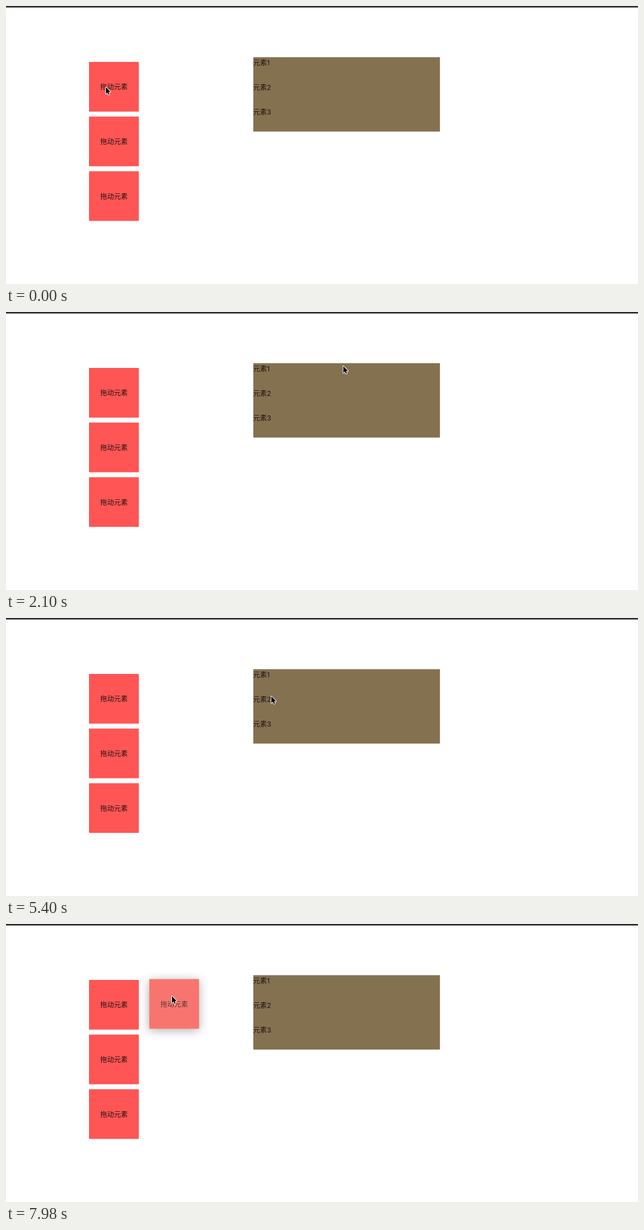
Recreate the animation shown at these times as an HTML page. Size 1127 by 497 pixels, loop 8000 ms.

```html
<!DOCTYPE html>
<html lang="zh-CN">
<head>
<meta charset="utf-8">
<style>
  html, body { margin: 0; width: 100%; height: 100%; overflow: hidden; background: #fff; }
  svg { display: block; font: 12.3px Inter, "Noto Sans CJK SC", "Noto Sans CJK JP", sans-serif; fill: #221411; }
  .mid { text-anchor: middle; }
  #ghost { opacity: .9; filter: drop-shadow(0 3px 9px rgba(0, 0, 0, .35)); }
  #dialog { filter: drop-shadow(0 3px 10px rgba(0, 0, 0, .38)); }
</style>
</head>
<body>
<svg width="1127" height="497" viewBox="0 0 1127 497">
  <rect width="1127" height="2.7" fill="#2b2a2d"/>
  <g id="boxes"></g>
  <rect x="441" y="91.5" width="332.8" height="133" fill="#847150"/>
  <g id="rows"></g>
  <g id="ghost">
    <rect width="88.8" height="88.8" fill="#f86760"/>
    <text class="mid" x="44.5" y="49.2" opacity=".8">拖动元素</text>
  </g>
  <g id="dialog">
    <rect x="410.3" y="-10" width="398.5" height="96.5" rx="4" fill="#272727"/>
    <path d="M548 .3h12m4-.3q3 1 5 0" fill="none" stroke="#77704a" stroke-width=".8"/>
    <text x="425" y="25" font-size="11.8" fill="#f1f1f1">点击添加触发</text>
    <rect x="737.3" y="43.3" width="57" height="28.7" rx="3.5" fill="#8ab4f8"/>
    <text class="mid" x="765.5" y="61.6" font-size="10.7" font-weight="700" fill="#202124">确定</text>
  </g>
  <g id="cursor" stroke-linejoin="round">
    <path id="arrow" d="M1 1V13L3.7 10.4 5.6 14.6 7.5 13.8 5.7 9.7H9.4Z"
      fill="#000" stroke="#fff" stroke-width="2" paint-order="stroke"/>
    <g id="hand" stroke="#000" stroke-width=".9">
      <path fill="#fff" d="M0 .8C.5-.7 2-.5 2.5.8L4 4.7C5 3.9 6 4.3 6.3 5.2 7.2 4.5 8.2 5 8.5 5.9 9.5 5.5 10.3 6 10.4 7V10.500L9.500 14.200H3.500L-1.200 9C-1.800 8-.4 7 .8 8L2 9Z"/>
      <path fill="none" stroke-width=".6" d="M4.500 9v3m1.900-3v3m1.800-3v3"/>
    </g>
  </g>
</svg>
<script>
const $ = id => document.getElementById(id);
const LOOP = 8000, STEP = 60, DRAG = 7380;
const BOX_X = 148, GRAB_X = 182.7, GRAB_Y = 29.5;

for (let i = 0; i < 3; i++) {
  const y = 100 + i * 97.7;
  $('boxes').innerHTML += `<rect x="${BOX_X}" y="${y}" width="88.8" height="88.8" fill="#ff5555"/>
    <text class="mid" x="192.5" y="${y + 49.2}">拖动元素</text>`;
  $('rows').innerHTML += `<text x="440.7" y="${105.8 + i * 44.3}">元素${i + 1}</text>`;
}

// Pointer flicks: start, end, x, y
const moves = [
  [540, 1440, 770, 63],
  [1980, 2400, 532, 109],
  [2700, 3000, 497, 106],
  [3240, 4020, 477, 156],
  [4080, 4320, 476, 189],
  [4920, 5340, 474, 108],
  [5340, 5880, 469, 196],
  [6060, 6600, 195, 135],
  [6840, DRAG, 178, 129.5]
];

const clamp = v => Math.max(0, Math.min(1, v));
const progress = (t, start, end) => clamp((t - start) / (end - start));
const easeOut = p => 1 - (1 - p) ** 3.7;

function pointerAt(t) {
  let x = 177, y = 144;
  for (const [start, end, toX, toY] of moves) {
    const p = easeOut(progress(t, start, end));
    x += (toX - x) * p;
    y += (toY - y) * p;
  }
  const pull = progress(t, DRAG, 7980);
  return [x + 117 * pull, y - 1.5 * pull];
}

const place = (id, x, y) => $(id).setAttribute('transform', `translate(${x} ${y})`);
const show = (id, on) => $(id).style.display = on ? '' : 'none';

function draw() {
  const t = Math.floor(performance.now() % LOOP / STEP) * STEP;
  const [x, y] = pointerAt(t);
  const dragging = t >= DRAG;
  const hovering = t > 6000 && x < 237 && !dragging;
  place('cursor', x, y);
  show('arrow', !hovering);
  show('hand', hovering);

  // The dragged copy lags slightly behind the pointer.
  place('ghost', BOX_X + (x - GRAB_X) * .957, y - GRAB_Y);
  show('ghost', dragging);

  const fade = Math.min(progress(t, 420, 540), 1 - progress(t, 1680, 1800));
  show('dialog', fade > 0);
  $('dialog').style.opacity = fade;
  requestAnimationFrame(draw);
}
draw();
</script>
</body>
</html>
```
